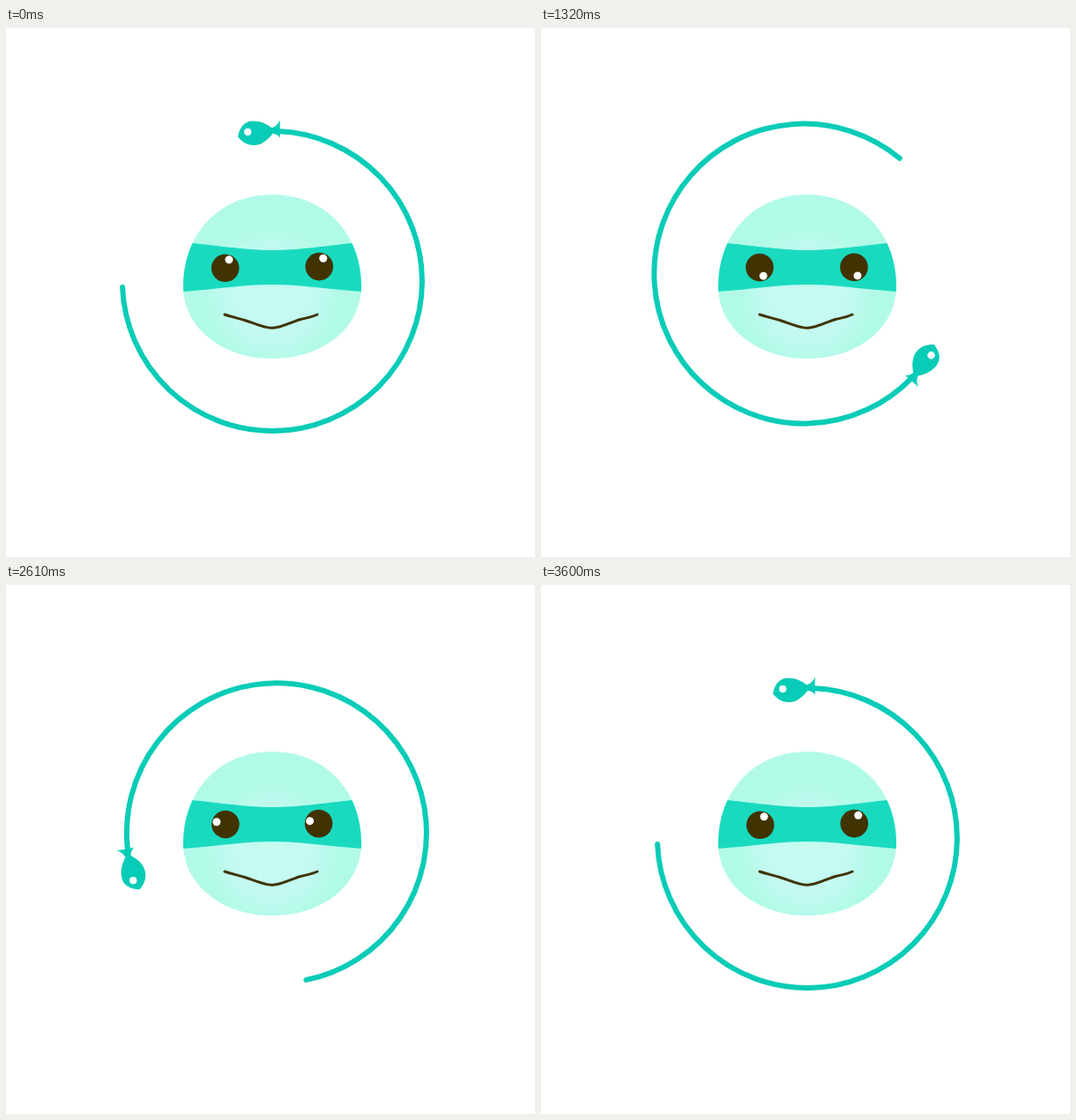
Recreate the animation shown at these times as an HTML page. Size 600 by 600 pixels, loop 3660 ms.

```html
<!DOCTYPE html>
<html lang="en">
<head>
<meta charset="utf-8">
<title>Masked face loader</title>
<style>
  html, body { margin: 0; width: 100%; height: 100%; overflow: hidden; background: #fff; }
  svg { display: block; width: 100vw; height: 100vh; }
</style>
</head>
<body>
<svg viewBox="0 0 600 600">
  <defs>
    <radialGradient id="glow" gradientUnits="userSpaceOnUse" cx="302" cy="303" r="76">
      <stop offset="0" stop-color="#c6faf2"/>
      <stop offset=".62" stop-color="#c3faf0"/>
      <stop offset="1" stop-color="#b2fae8"/>
    </radialGradient>
    <path id="head" d="M201 293C201 234 241 189 302 189S403 234 403 293C403 341 358 375 302 375S201 341 201 293Z"/>
    <clipPath id="headClip"><use href="#head"/></clipPath>
  </defs>

  <use href="#head" fill="url(#glow)"/>
  <path clip-path="url(#headClip)" fill="#19dabf"
    d="M190 241.500L211.500 244C250 248 272 252 302 252S354 248 392.500 244L414 241.500V300L403 299C364 296 334 291 302 291S240 296 201 299L190 300Z"/>
  <path fill="none" stroke="#403300" stroke-width="3" stroke-linecap="round"
    d="M248 325C256 327.500 264 329.500 271 331.500S292 340.300 302 340.300S326 332.500 334 330.500S347 328 353 325"/>

  <g id="leftEye">
    <circle cx="248.700" cy="272.300" r="15.800" fill="#403300"/>
    <circle cx="253" cy="262.800" r="4.500" fill="#fff"/>
  </g>
  <g id="rightEye">
    <circle cx="355.300" cy="270.600" r="15.800" fill="#403300"/>
    <circle cx="359.800" cy="261.200" r="4.500" fill="#fff"/>
  </g>

  <g id="swimmer">
    <path fill="none" stroke="#08ccb7" stroke-width="6" stroke-linecap="round"
      d="M132.100 294A170 170 0 1 0 308 117.100"/>
    <path fill="#08ccb7"
      d="M263 123.500C265 112 271 105.500 280 105.500C289 105.500 296 109 301.500 113.300C305.500 112 309 109 311 104.500C310.500 111 310.500 118 311 124.500C308.500 121.500 305.500 120 302.500 119.800C297 127 290 133 281 133C273.500 133 267.500 129 263 123.500Z"/>
    <circle cx="274.200" cy="117.900" r="4.100" fill="#fff"/>
  </g>
</svg>
<script>
  const LOOP = 3660, STEP = 30, TURN_STEPS = 120;
  const spinners = [
    ['swimmer', 302, 282],
    ['leftEye', 248.5, 271.8],
    ['rightEye', 355, 270.9]
  ].map(([id, x, y]) => ({ node: document.getElementById(id), x, y }));

  // One full turn in even steps, then a short rest before the loop restarts.
  function draw(ms) {
    const step = Math.min(Math.floor((ms % LOOP) / STEP), TURN_STEPS);
    const angle = step * 360 / TURN_STEPS;
    for (const { node, x, y } of spinners) {
      node.setAttribute('transform', `rotate(${angle} ${x} ${y})`);
    }
  }

  const start = performance.now();
  function tick() {
    draw(performance.now() - start);
    requestAnimationFrame(tick);
  }
  tick();
</script>
</body>
</html>
```
